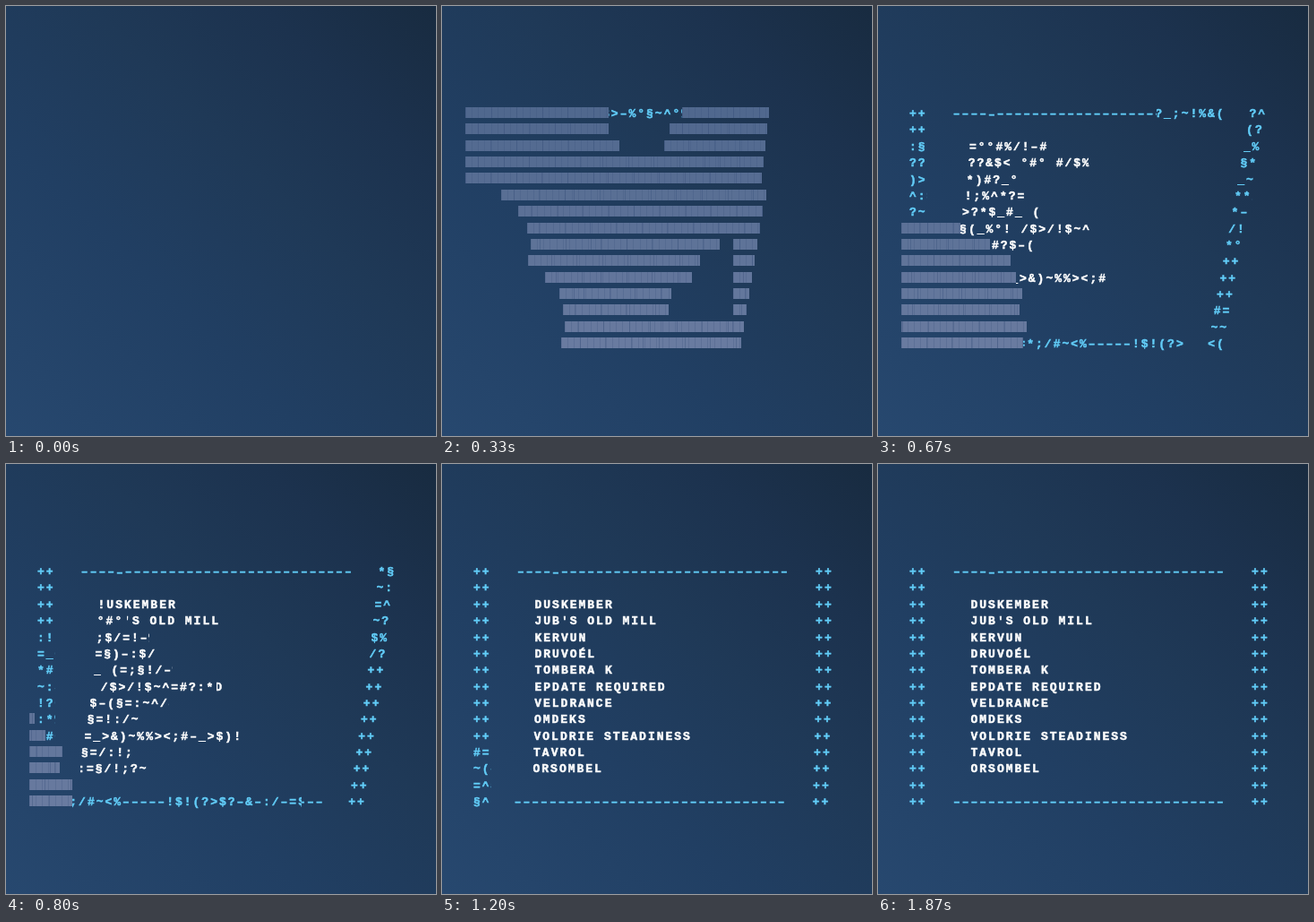
These frames come from a looping animation (480 by 480 pixels, 1940 ms). An HTML page without scripts:

```html
<!DOCTYPE html>
<html lang="en">
<head>
<meta charset="utf-8">
<title>Scrambled panel</title>
<style>
@property --t { syntax: "<number>"; inherits: true; initial-value: 0; }
@keyframes tick { from { --t: 0 } to { --t: 29 } }

html, body { margin: 0; width: 100%; height: 100%; overflow: hidden; }
body {
  position: relative;
  background: linear-gradient(45deg, #27486f, #213f63 35%, #1f3957 60%, #1c324e 80%, #182b40);
  font: bold 13px/18.36px "Liberation Mono", "Courier New", monospace;
  letter-spacing: 2px;
  color: #62cdf8;
  -webkit-text-stroke: .5px currentColor;
  animation: tick 1940ms steps(29) -6ms infinite;
}

/* --t counts ticks; --end is the right edge of a row, --cut and --gap bound its readable part */
.row {
  --e1: calc(min(343 - 2.9 * (var(--i) - 5), 330 + 13 * clamp(0, var(--i) - 4, 1)));
  --e2: calc(400 - 4.2 * var(--i) + .05 * var(--i) * var(--i));
  --e3: calc(434 - 3.3 * var(--i));
  --e4: calc(min(436.7, 436.7 - 2 * (var(--i) - 7)));
  --end: calc(var(--e1) - 10 * max(0, 3 - var(--t))
    + (var(--e2) - var(--e1)) * clamp(0, (var(--t) - 3) / 4, 1)
    + (var(--e3) - var(--e2)) * clamp(0, (var(--t) - 7) / 3, 1)
    + (var(--e4) - var(--e3)) * clamp(0, (var(--t) - 10) / 5, 1)
    + (436.7 - var(--e4)) * clamp(0, (var(--t) - 15) / 4, 1));
  --start: calc(max(26, var(--s) - var(--v) * (var(--t) - 3) - 16 * max(0, var(--t) - 7)));
  --cut: calc(min(var(--end), max(26, var(--r) - var(--w) * (var(--t) - 7) - 30 * max(0, var(--t) - 10))));
  --gap: calc(var(--b) + 25 * (var(--t) - 7) + 25 * max(0, var(--t) - 7));
  position: absolute;
  left: 0;
  top: calc(112.1px + var(--i) * 18.36px);
  width: 480px;
  height: 18.36px;
  opacity: min(1, var(--t));
}

/* blocks */
i {
  position: absolute;
  top: .9px;
  height: 12px;
  left: calc(var(--start) * 1px);
  width: calc(max(0, var(--cut) - var(--start)) * 1px);
  background:
    repeating-linear-gradient(90deg, #3a527c66 0 1px, #0000 1px 28.6px),
    repeating-linear-gradient(90deg, #3a527c40 0 1px, #0000 1px 7.15px),
    color-mix(in srgb, #697ba0 calc(var(--i) * 7%), #50688e);
  background-position: calc(var(--i) * -43px) 0, 0 0;
}
i + i {
  --from: max(var(--gap), var(--cut), var(--start));
  left: calc(var(--from) * 1px);
  width: calc(max(0, var(--end) - var(--from)) * 1px);
}

/* text */
p {
  position: absolute;
  inset: 0;
  margin: 0;
  clip-path: inset(0 calc(480px - var(--gap) * 1px) 0 calc(var(--cut) * 1px));
}
b { position: absolute; top: 0; white-space: pre; }
u, s, em { text-decoration: none; font-style: normal; }
u { display: block; }
s { position: absolute; left: 0; top: 0; width: 100%; overflow: hidden; }
s::before { content: ""; margin-left: calc((7 - var(--t)) * var(--p, 1) * 9.8px); }
em { position: relative; top: 1px; }

.l { --z: calc(8.9 + .85 * var(--i)); left: 34.9px; }
.r { --z: calc(9.4 + .55 * max(var(--i) - 10, 10 - var(--i))); left: calc(var(--end) * 1px - 19.6px); }
.l u, .r u { opacity: clamp(0, (var(--t) - var(--z)) * 99, 1); }
.l s, .r s { opacity: clamp(0, (var(--z) - var(--t)) * 99, 1); }

.m {
  --p: 3;
  --x: calc(var(--base, 103.5) - (.04 + .063 * var(--i)) * (436.7 - var(--end)));
  --edge: calc(max(0, min(85 + 25 * (var(--i) - 7), 180) - 50 * (var(--t) - 15) - var(--x)) * 1px);
  left: calc(var(--x) * 1px);
  color: #fff;
}
.m u { clip-path: inset(0 0 0 var(--edge)); }
.m s { clip-path: inset(0 calc(100% - var(--edge)) 0 0); }
.rule { --base: 83.9; color: inherit; }
.top { --edge: calc(max(0, 80 + 77 * (var(--t) - 7) - var(--x)) * 1px); }
.top u { clip-path: inset(0 calc(100% - var(--edge)) 0 0); }
.top s { clip-path: inset(0 0 0 var(--edge)); }
.low { --p: 6; }
</style>
</head>
<body>
<div class="row" style="--i:0;--s:26;--v:40;--r:26;--w:80;--b:318"><i></i><i></i><p>
<b class="l"><u>++</u><s>^&lt;?:</s></b>
<b class="m rule top"><u>––––<em>–</em>––––––––––––––––––––––––––</u><s>=;°!$&gt;–%°§~^°%_§&amp;$_)~/^=–!*?§#;(?_;~!%&amp;(/=$^*:)#</s></b>
<b class="r"><u>++</u><s>$=:?^*§!;</s></b></p></div>

<div class="row" style="--i:1;--s:26;--v:40;--r:26;--w:80;--b:304"><i></i><i></i><p>
<b class="l"><u>++</u><s>:_*$/</s></b>
<b class="r"><u>++</u><s>=*!(?~:#$</s></b></p></div>

<div class="row" style="--i:2;--s:26;--v:40;--r:78;--w:60;--b:298"><i></i><i></i><p>
<b class="l"><u>++</u><s>/=*:§!</s></b>
<b class="m"><u>DUSKEMBER</u><s>?/&gt;&amp;&gt;/#=&gt;=°°#%/!–#&amp;$(*?%</s></b>
<b class="r"><u>++</u><s>#?;_%=^!(</s></b></p></div>

<div class="row" style="--i:3;--s:26;--v:40;--r:188;--w:60;--b:293"><i></i><i></i><p>
<b class="l"><u>++</u><s>(~%??;#</s></b>
<b class="m"><u>JUB'S OLD MILL</u><s>=/!;~(_$:??&amp;$&lt; °#° #/$%=;!~(&amp;^_*§</s></b>
<b class="r"><u>++</u><s>!:/§*~?=</s></b></p></div>

<div class="row" style="--i:4;--s:93;--v:45;--r:235;--w:70;--b:289"><i></i><i></i><p>
<b class="l"><u>++</u><s>$=#)&gt;:!*</s></b>
<b class="m"><u>KERVUN</u><s>%!/=(§~^:*)#?_°;$/=!–%^?</s></b>
<b class="r"><u>++</u><s>°#!_~$%:</s></b></p></div>

<div class="row" style="--i:5;--s:142;--v:38;--r:248;--w:74;--b:301"><i></i><i></i><p>
<b class="l"><u>++</u><s>?*/^:=_~$</s></b>
<b class="m"><u>DRUVOÉL</u><s>#=$/(~_°:!;%^*?=§)–:$/#~!(</s></b>
<b class="r"><u>++</u><s>%;=**/?</s></b></p></div>

<div class="row" style="--i:6;--s:161;--v:38;--r:252;--w:76;--b:323"><i></i><i></i><p>
<b class="l"><u>++</u><s>!=;?~*#:/$</s></b>
<b class="m"><u>TOMBERA K</u><s>:°~/=%^$!&gt;?*$_#_ (=;§!/–%:*^#~?$</s></b>
<b class="r"><u>++</u><s>^:$*–=!</s></b></p></div>

<div class="row" style="--i:7;--s:171;--v:38;--r:248;--w:52;--b:345"><i></i><i></i><p>
<b class="l"><u>++</u><s>/?=!;~:$#*</s></b>
<b class="m"><u>EPDATE REQUIRED</u><s>*=;:^?%/~§(_%°! /$&gt;/!$~^=#?:*(–_;%)!=/°</s></b>
<b class="r"><u>++</u><s>;=~/!*</s></b></p></div>

<div class="row" style="--i:8;--s:175;--v:38;--r:236;--w:37;--b:375"><i></i><i></i><p>
<b class="l"><u>++</u><s>=:*/;!?~#_</s></b>
<b class="m"><u>VELDRANCE</u><s>~=/^:;$*?!%_/#?$–(§=:~^/#;*(%!?=_:</s></b>
<b class="r"><u>++</u><s>&lt;*=*°</s></b></p></div>

<div class="row" style="--i:9;--s:172;--v:38;--r:232;--w:28;--b:375"><i></i><i></i><p>
<b class="l"><u>++</u><s>;?!=/:*%#?~</s></b>
<b class="m"><u>OMDEKS</u><s>!/=°^~:;?$#(*_%§=!:/~;?^–=/$:*#!(_</s></b>
<b class="r"><u>++</u><s>)§:=/</s></b></p></div>

<div class="row" style="--i:10;--s:177;--v:31;--r:229;--w:25;--b:375"><i></i><i></i><p>
<b class="l"><u>++</u><s>*/:=!;#~?°$:</s></b>
<b class="m"><u>VOLDRIE STEADINESS</u><s>=?/!°~:;^$*#§(%=_&gt;&amp;)~%%&gt;&lt;;#–_&gt;$)!*/=:?~^;#%</s></b>
<b class="r"><u>++</u><s>&amp;&lt;=!$</s></b></p></div>

<div class="row" style="--i:11;--s:174;--v:21.75;--r:218;--w:19;--b:375"><i></i><i></i><p>
<b class="l"><u>++</u><s>!?:/*=~;(&amp;^#=</s></b>
<b class="m"><u>TAVROL</u><s>:$/=~!;?^*#_%(°§=/:!;~*?$=/;#=^!:%_(~</s></b>
<b class="r"><u>++</u><s>^(;/:</s></b></p></div>

<div class="row" style="--i:12;--s:171;--v:18;--r:215;--w:19;--b:375"><i></i><i></i><p>
<b class="l"><u>++</u><s>=/*:?!;$–:#~(^</s></b>
<b class="m"><u>ORSOMBEL</u><s>/:?=;!~$^%*_#(°:=§/!;?~*!:&gt;^&amp;°~°=/#?;$*(:%</s></b>
<b class="r"><u>++</u><s>!/:#=~</s></b></p></div>

<div class="row" style="--i:13;--s:169;--v:16;--r:214;--w:16;--b:295"><i></i><i></i><p>
<b class="l"><u>++</u><s>:;=/!*?~(°$=^#_</s></b>
<b class="r"><u>++</u><s>=:;~~*!</s></b></p></div>

<div class="row" style="--i:14;--s:161;--v:14.25;--r:204;--w:14;--b:276"><i></i><i></i><p>
<b class="l"><u>++</u><s>?=/;*:!~)–#§^:=$</s></b>
<b class="m rule low"><u>–––––––––––––––––––––––––––––––</u><s>:/=?;!~*^$#%_(°§:=/!=~:&lt;=$(*;?=*;/#~&lt;%–––––!$!(?&gt;$?–&amp;–:/–=$!*;=~^/:?#(%_</s></b>
<b class="r"><u>++</u><s>;=!&lt;(:*?</s></b></p></div>
</body>
</html>
```
